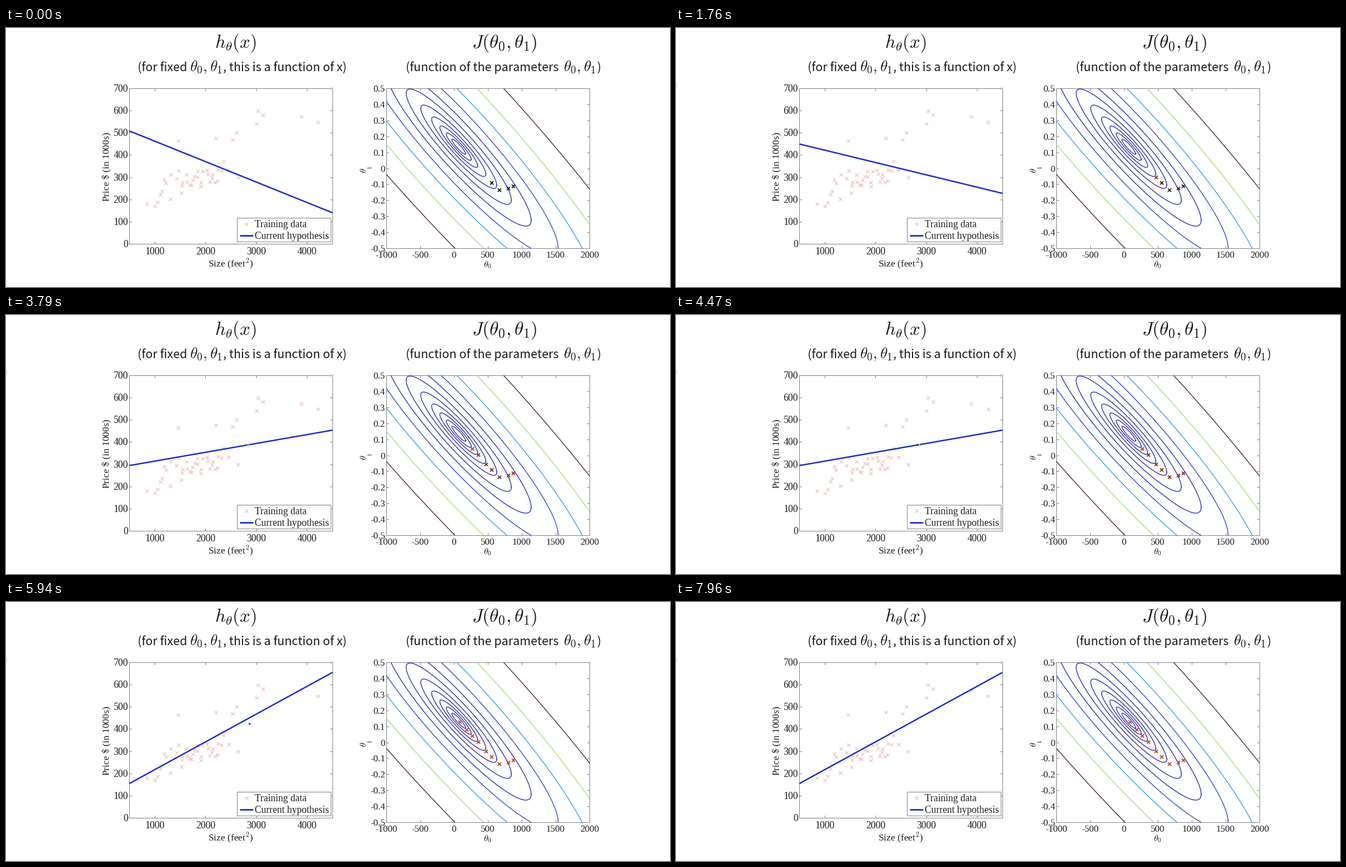
Write a matplotlib script that moves like this. It is 1196x468 px and loops after 8 s.

```python
import numpy as np
import matplotlib.pyplot as plt
from matplotlib.animation import FuncAnimation
from matplotlib.colors import to_hex, to_rgb
from matplotlib.patches import Rectangle, Circle

W, H, DPI = 1196, 468, 52
PT = 72 / DPI            # points per pixel
STEP, LOOP = 40, 8000    # ms

plt.rcParams["mathtext.fontset"] = "cm"
fig = plt.figure(figsize=(W / DPI, H / DPI), dpi=DPI, facecolor="white")
ax = fig.add_axes([0, 0, 1, 1])
ax.set_xlim(0, W)
ax.set_ylim(H, 0)
ax.axis("off")

SERIF, SANS = "Liberation Serif", "Noto Sans CJK JP"
INK, BLUE, PINK, EDGE = "#1a1a1a", "#1c2ad0", "#e8b4b4", "#808088"


def text(x, y, s, px, font=SERIF, ha="left", va="baseline", **kw):
    ax.text(x, y, s, fontsize=px * PT, family=font, ha=ha, va=va, color=INK, **kw)


def stroke(xs, ys, color, px, **kw):
    return ax.plot(xs, ys, color=color, lw=px * PT, **kw)[0]


def crosses(xs, ys, color, size, px, **kw):
    return ax.plot(xs, ys, "x", color=color, ms=size * PT, mew=px * PT, **kw)[0]


def disc(r, fill, edge="none", px=0, z=7):
    return ax.add_patch(Circle((0, 0), r, fc=fill, ec=edge, lw=px * PT, zorder=z))


def mix(a, b, f):
    return to_hex((1 - f) * np.array(to_rgb(a)) + f * np.array(to_rgb(b)))


def frame_box(x0, y0, x1, y1, xticks, yticks):
    box = ax.add_patch(Rectangle((x0, y0), x1 - x0, y1 - y0, fc="none",
                                 ec=EDGE, lw=PT, zorder=2))
    for x in xticks:
        stroke([x, x], [y1, y1 - 4], EDGE, 1)
        stroke([x, x], [y0, y0 + 4], EDGE, 1)
    for y in yticks:
        stroke([x0, x0 + 4], [y, y], EDGE, 1)
        stroke([x1 - 4, x1], [y, y], EDGE, 1)
    return box


# Headings
text(376, 36, r"$h_\theta(x)$", 33)
text(839, 36, r"$J(\theta_0,\theta_1)$", 33.5)
text(237, 78, "(for fixed", 21.5, SANS)
text(331, 78, r"$\theta_0,\theta_1$", 27)
text(391, 78, ", this is a function of x)", 21.5, SANS)
text(720, 78, "(function of the parameters", 21.5, SANS)
text(1004, 78, r"$\theta_0,\theta_1$", 27)
text(1064, 78, ")", 21.5, SANS)


# Left plot: price against size
def left_x(size):
    return 222.3 + (np.asarray(size) - 500) * 0.09143


def left_y(price):
    return 390 - np.asarray(price) * 0.40143


sizes, prices = range(1000, 4001, 1000), range(0, 701, 100)
frame_box(222, 109, 588, 390, left_x(sizes), left_y(prices))
for s in sizes:
    text(left_x(s), 409, str(s), 17.7, ha="center")
for p in prices:
    text(220, left_y(p) + 6, str(p), 17.7, ha="right")
text(404.5, 432, "Size (feet$^2$)", 17.5, ha="center")
text(181, 251, r"Price $\$$ (in 1000s)", 17.5, ha="center", va="center", rotation=90)

# A dense cloud of ordinary houses and the few that stand apart
rng = np.random.default_rng(8)
common = np.linspace(1120, 2400, 34) + rng.normal(0, 40, 34)
cost = 145 + 0.085 * common + rng.uniform(-60, 60, 34)
APART = np.array([(852, 180), (1000, 170), (1458, 464), (2200, 475), (2526, 469),
                  (2609, 500), (2637, 300), (3000, 540), (3031, 599), (3137, 580),
                  (3890, 574), (4215, 549), (4478, 700)])
for hx, hy in ((common, cost), APART.T):
    crosses(left_x(hx), left_y(hy), PINK, 6, 1, zorder=3)

fit = stroke([], [], BLUE, 2.5, zorder=4, solid_capstyle="butt")

# Legend
ax.add_patch(Rectangle((416, 343), 169, 43, fc="white", ec=EDGE, lw=PT, zorder=5))
crosses([433], [354], PINK, 6, 1, zorder=6)
stroke([421, 445], [374.5, 374.5], BLUE, 2.8, zorder=6, solid_capstyle="butt")
text(448, 360, "Training data", 17.6, zorder=6)
text(448, 381, "Current hypothesis", 17.6, zorder=6)


# Right plot: contours of the cost
def right_x(theta0):
    return 807 + np.asarray(theta0) * 0.122


def right_y(theta1):
    return 253.5 - np.asarray(theta1) * 289


xt, yt = range(-1000, 2001, 500), np.arange(-5, 6) / 10
area = frame_box(685, 109, 1051, 398, right_x(xt), right_y(yt))
for v in xt:
    text(right_x(v), 415, str(v), 17, ha="center")
for v in yt:
    text(683, right_y(v) + 6, f"{v:.1f}" if v else "0", 17, ha="right")
text(867, 432, r"$\theta_0$", 16, ha="center")
text(645, 257, r"$\theta$", 16, ha="center", va="center", rotation=90)
text(655, 251, "1", 11, ha="center", va="center", rotation=90)

CX, CY, ASPECT, RHO = 815.5, 214.5, 1.1, 0.926
OUTER = ["#4c2c2a", "#acdc7c", "#3a9fe4", "#3848cc"]
turn = np.linspace(0, 2 * np.pi, 300)
lean = np.arccos(RHO)
for k in range(11):
    reach = np.sqrt(211000 / 1.87 ** k - 250)
    color = OUTER[min(k, 3)] if k < 4 else "#3030b4"
    ring = stroke(CX + reach * np.cos(turn),
                  CY + ASPECT * reach * np.cos(turn - lean), color, 1.4, zorder=3)
    ring.set_clip_path(area)

# Descent: each (theta0, theta1) is a mark on the right and a line on the left
TRAIL = np.array([(881, -0.112), (803, -0.128), (676, -0.138), (554, -0.092),
                  (477, -0.0555), (357, 0.0006), (274, 0.0398), (190, 0.079),
                  (92, 0.125)])
STARTS = np.array([0, 1760, 3000, 3790, 5020, 5940])
old_marks = crosses([], [], INK, 5.5, 2, zorder=5)
new_mark = crosses([], [], INK, 5.5, 2, zorder=5)

# Pointer, busy ring and a faint speck at the left edge
halo = disc(2.2, "#c4c4d6")
tip = disc(1.5, "#26263a", z=8)
busy = [disc(6.5, "#e2eeee", "#64868f", 4.5), disc(6.5, "none", "#a5cbcb", 2, 8)]
for part in busy:
    part.center = (428.5, 241.5)
speck = stroke([0.5, 0.5], [100, 108], "#d8cccc", 1.5, linestyle=(0, (1.5, 1)))


def draw(i):
    t = i * STEP
    state = np.sum(i >= STARTS // STEP) - 1
    shown = TRAIL[:4 + state]
    theta0, theta1 = shown[-1]
    span = np.array([500, 4500])
    fit.set_data(left_x(span), left_y(theta0 + theta1 * span))

    # Marks warm from black to red as the descent goes on
    warm = mix("#2c2220", "#cc4c2c", state / 5)
    xs, ys = right_x(shown[:, 0]), right_y(shown[:, 1])
    old_marks.set_data(xs[:-1], ys[:-1])
    old_marks.set_color(warm)
    new_mark.set_data(xs[-1:], ys[-1:])
    new_mark.set_color(mix(warm, "#d0583c", 0.6 if state else 0))

    for part in busy:
        part.set_visible(2880 <= t < 3120)
    speck.set_visible(t >= 480)

    x = np.interp(t, [3000, 5940], [433, 438.5])
    y = np.interp(t, [3000, 3790, 5880, 5940], [241, 235, 233, 213.5])
    halo.center = (x + 2, y + 1)
    tip.center = (x, y)
    halo.set_visible(3120 <= t < 6400)
    tip.set_visible(4200 <= t < 6400)
    return []


anim = FuncAnimation(fig, draw, frames=LOOP // STEP, interval=STEP,
                     init_func=lambda: draw(0), repeat=True, repeat_delay=0,
                     blit=False)
plt.show()
```
